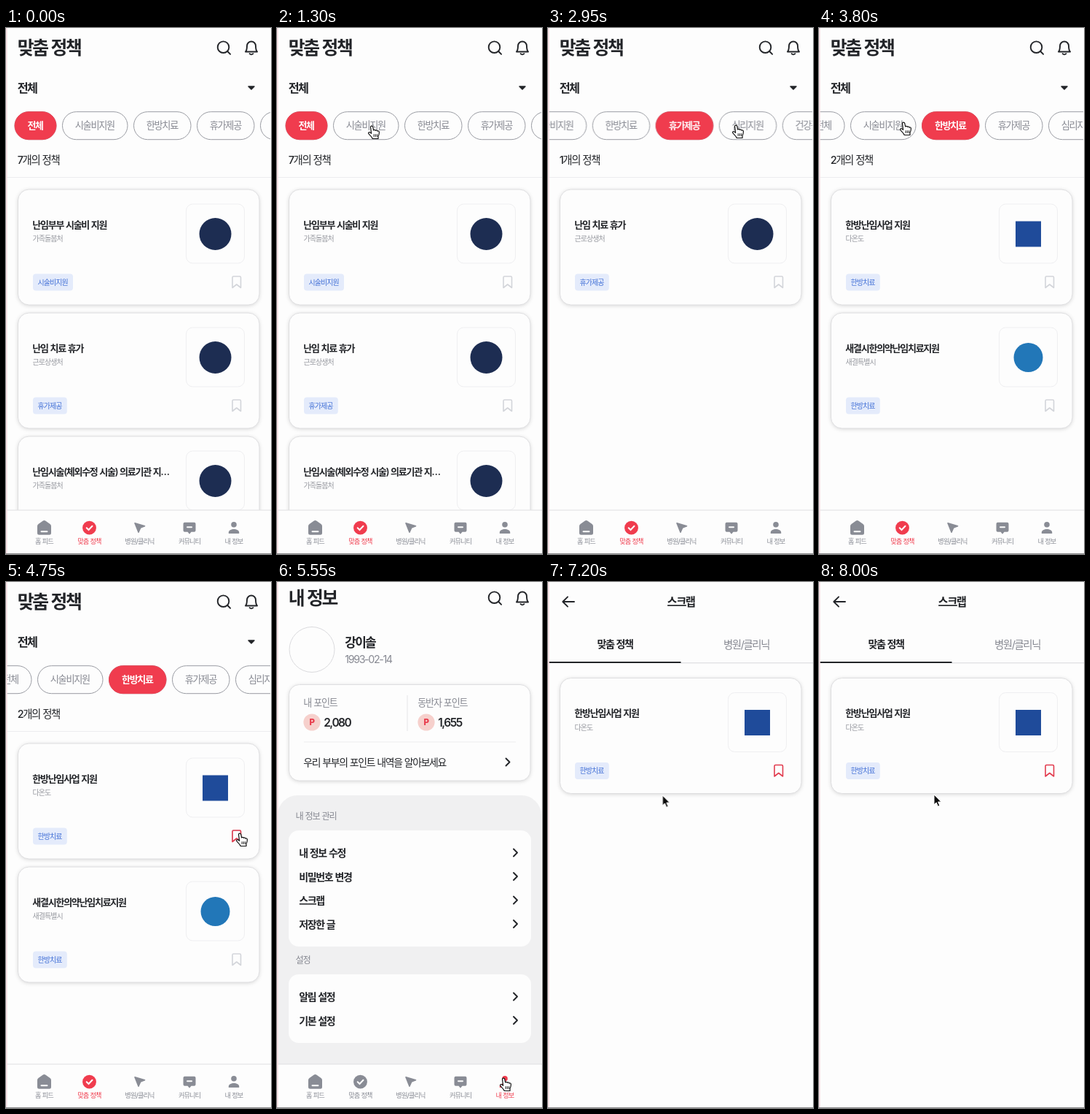
Write an HTML page that moves like this. It is 364 px wide and 720 px high and loops after 8050 ms.

```html
<!DOCTYPE html>
<html lang="ko">
<head>
<meta charset="utf-8">
<title>맞춤 정책</title>
<style>
html, body { margin: 0; width: 100%; height: 100%; overflow: hidden; background: #fdfdfd; }
svg { display: block; width: 364px; height: 720px; }
text { font-family: Inter, 'Noto Sans CJK KR', 'Noto Sans CJK', sans-serif; letter-spacing: -.097em; word-spacing: .06em; white-space: pre; }
.card { fill: #fdfdfd; stroke: #dedee0; filter: drop-shadow(0 1.5px 2.5px rgba(0, 0, 0, .14)); }
.line { fill: none; stroke: #222428; stroke-width: 1.9; stroke-linecap: round; stroke-linejoin: round; }
.mark { fill: none; stroke-width: 1.6; stroke-linejoin: round; }
</style>
</head>
<body>
<svg id="stage" viewBox="0 0 364 720" lang="ko"></svg>
<script>
const LOOP = 8050;
const INK = '#222428', GRAY = '#878992', RED = '#f03c4e', NAVY = '#1d2d52', BLUE = '#1f4b9a', SKY = '#2277b8';
const OPEN_ME = 5450, OPEN_SCRAP = 6300, SAVE = 4700;
const PICK = { fee: 1750, herb: 2200, leave: 2720, back: 3450 };

// ---- animation rules, times in ms ----
const pct = ms => Math.max(0, (ms - 1) / LOOP * 100).toFixed(3) + '%';
let css = '';

// visible from the first time, hidden from the second, and so on
function show(name, ...times) {
  const steps = times.map((t, i) => `${pct(t)}{opacity:${(i + 1) % 2}}`).join('');
  const last = times.length % 2;
  css += `@keyframes ${name}{${times[0] ? '0%{opacity:0}' : ''}${steps}100%{opacity:${last}}}
    .${name}{animation:${name} ${LOOP}ms step-end infinite}`;
}

// each key is [time, x, y, easing to the next key]
function move(name, keys) {
  const at = ([, x, y]) => `transform:translate(${x}px,${y}px)`;
  const steps = keys.map(k => `${pct(k[0])}{${at(k)};animation-timing-function:${k[3] || 'ease'}}`).join('');
  css += `@keyframes ${name}{0%{${at(keys[0])}}${steps}100%{${at(keys[keys.length - 1])}}}
    .${name}{animation:${name} ${LOOP}ms infinite}`;
}

show('policy', 0, OPEN_ME);
show('me', OPEN_ME, OPEN_SCRAP);
show('scrap', OPEN_SCRAP);
show('all', 0, PICK.fee);
show('fee', PICK.fee, PICK.herb);
show('herb', PICK.herb, PICK.leave, PICK.back);
show('leave', PICK.leave, PICK.back);
show('saved', SAVE);
show('hand', 1150, 4360, 4480, 4960, 5110, 5680, 6050, OPEN_SCRAP);
show('arrow', 0, 1150, 4360, 4480, 4960, 5110, 5680, 6050, OPEN_SCRAP);

move('chips', [
  [PICK.herb, 0, 0], [PICK.herb + 350, -34, 0],
  [PICK.leave, -34, 0], [PICK.leave + 350, -121, 0],
  [PICK.back, -121, 0], [PICK.back + 350, -34, 0]
]);
move('cursor', [
  [800, 175, -22, 'linear'], [900, 167, 29, 'ease-out'], [1250, 130, 134],
  [1800, 130, 134], [2100, 210, 136], [2250, 210, 136], [2600, 258, 133],
  [3050, 258, 133], [3400, 116, 129],
  [3880, 116, 129, 'ease-in'], [4300, 190, 131, 'ease-out'], [4650, 321, 344],
  [4850, 321, 344], [5250, 311, 679],
  [5600, 311, 679], [6200, 65, 434],
  [6450, 65, 434], [7300, 158, 291]
]);

// ---- drawing helpers ----
const group = (cls, ...parts) => `<g class="${cls}">${parts.join('')}</g>`;
const shift = (x, y, ...parts) => `<g transform="translate(${x} ${y})">${parts.join('')}</g>`;
const rect = (x, y, w, h, r, attrs) => `<rect x="${x}" y="${y}" width="${w}" height="${h}" rx="${r}" ${attrs}/>`;
const fill = c => `fill="${c}"`;
const circle = (x, y, r, attrs) => `<circle cx="${x}" cy="${y}" r="${r}" ${attrs}/>`;
const path = (d, attrs) => `<path d="${d}" ${attrs}/>`;

// cy is the middle of the glyphs
function text(s, x, cy, size, color = INK, weight = 400, anchor = 'start') {
  const left = anchor === 'start' ? x - size * .05 : x;
  return `<text x="${left.toFixed(2)}" y="${(cy + size * .36).toFixed(2)}" font-size="${size}" font-weight="${weight}" fill="${color}" text-anchor="${anchor}">${s}</text>`;
}
const middle = (s, x, cy, size, color, weight) => text(s, x, cy, size, color, weight, 'middle');
const chevron = (x, y) => path(`M${x - 2.5} ${y - 5}l5 5-5 5`, 'class="line"');

const header = (title, cy) => text(title, 17, cy, 24.8, INK, 700) + shift(0, cy - 27,
  circle(298.5, 26.2, 7.8, 'class="line"'), path('M304.3 32l3.8 3.8', 'class="line"'),
  path('M329 32.5c1.6-1.8 2-3.4 2-8a6 6 0 0 1 12 0c0 4.6.4 6.2 2 8zM334.6 35.2q2.4 2.4 4.8 0', 'class="line"'));

const bookmark = (y, cls, color) => path(`M311 ${y + 120.5}q0-1.5 1.5-1.5h8.5q1.5 0 1.5 1.5v14l-5.75-4.5-5.75 4.5z`, `class="mark ${cls}" stroke="${color}"`);

const logos = {
  state: y => circle(287.5, y, 22, fill(NAVY)),
  province: y => rect(270, y - 17.5, 35, 35, 0, fill(BLUE)),
  city: y => circle(287.5, y, 20, fill(SKY))
};

function card(y, [title, office, tag, logo], save = '') {
  const w = tag.length * 8.2 + 14;
  return rect(16.5, y, 331.5, 158, 15, 'class="card"') +
    text(title, 37, y + 48.3, 13, INK, 600) +
    text(office, 37, y + 67.8, 10, '#96989f') +
    rect(37, y + 115.5, w, 23, 4, fill('#e4ebfb')) +
    middle(tag, 36.6 + w / 2, y + 127, 10, '#4270d6', 500) +
    rect(247.5, y + 20, 80, 81, 9, 'fill="#fdfdfd" stroke="#efeff1"') +
    logos[logo](y + 61) +
    bookmark(y, '', save === 'on' ? '#e23c4f' : '#d3d5da') +
    (save === 'saved' ? bookmark(y, 'saved', '#e23c4f') : '');
}

const FEE = ['난임부부 시술비 지원', '가족돌봄처', '시술비지원', 'state'];
const LEAVE = ['난임 치료 휴가', '근로상생처', '휴가제공', 'state'];
const CLINIC = ['난임시술(체외수정 시술) 의료기관 지…', '가족돌봄처', '시술비지원', 'state'];
const HERB = ['한방난임사업 지원', '다온도', '한방치료', 'province'];
const CITY = ['새결시한의약난임치료지원', '새결특별시', '한방치료', 'city'];

const list = (cls, count, cards) => group(cls,
  text(count + '개의 정책', 16.5, 181.2, 14.4, INK, 500),
  ...cards.map((c, i) => card(221 + i * 169, c, c === HERB ? 'saved' : '')));

// ---- bottom bar ----
const icons = [
  c => path('M-9.5-2.5Q-9.5-4-8-5.2L-2-9.5Q0-11 2-9.5L8-5.2Q9.5-4 9.5-2.5V7Q9.5 9.5 7 9.5H-7Q-9.5 9.5-9.5 7z', fill(c)) + rect(-5, 4, 10, 2, 1, fill('#fdfdfd')),
  c => circle(0, 0, 9.4, fill(c)) + path('M-3.8 0l2.8 2.8L4-2.4', 'fill="none" stroke="#fdfdfd" stroke-width="2" stroke-linecap="round"'),
  c => path('M-6.5-6.5L7-2.5 1.3-.2-1.5 6z', `fill="${c}" stroke="${c}" stroke-width="1.6" stroke-linejoin="round"`),
  c => path('M-6.5-7.5h13q2 0 2 2v9q0 2-2 2H2.5L0 8.5-2.5 5.5h-4q-2 0-2-2v-9q0-2 2-2z', fill(c)) + rect(-4, -2, 8, 2, 1, fill('#fdfdfd')),
  c => circle(0, -4.5, 3.8, fill(c)) + path('M-7.2 7.8V6.5C-7.2.3 7.2.3 7.2 6.5V7.8z', fill(c))
];
const tabs = [['홈 피드', 52.5], ['맞춤 정책', 114.5], ['병원/클리닉', 183.5], ['커뮤니티', 252], ['내 정보', 313]];

const nav = active => rect(0, 660, 364, 60, 0, fill('#fdfdfd')) + rect(0, 659.5, 364, 1, 0, fill('#dfdfe1')) +
  tabs.map(([label, x], i) => {
    const c = i === active ? RED : '#898c95';
    return shift(x, 684.2, icons[i](c)) + middle(label, x, 702.8, 9.2, c, 500);
  }).join('');

// ---- pages ----
const chipList = [['전체', 12, 57, 'all'], ['시술비지원', 77.5, 89.5, 'fee'], ['한방치료', 175.5, 78.5, 'herb'],
  ['휴가제공', 262.5, 78.5, 'leave'], ['심리지원', 349.5, 78.5], ['건강관리', 436.5, 78.5]];

const chip = ([label, x, w, cls]) => {
  const mid = x + w / 2 - .4;
  const pill = attrs => rect(x, 114.7, w, 38, 19, attrs);
  return pill('fill="#fdfdfd" stroke="#999ba2"') + middle(label, mid, 133.5, 13.2, GRAY, 500) +
    (cls ? group(cls, pill(`fill="${RED}" stroke="${RED}" stroke-width=".8"`), middle(label, mid, 133.5, 13, '#fff', 600)) : '');
};

const policy = group('policy',
  header('맞춤 정책', 27),
  text('전체', 16.5, 82, 16.3, INK, 700),
  path('M333 80h8l-4 4z', `fill="${INK}" stroke="${INK}" stroke-width="1.5" stroke-linejoin="round"`),
  `<g clip-path="url(#view)">${group('chips', ...chipList.map(chip))}</g>`,
  rect(0, 204, 364, 1, 0, fill('#ededef')),
  list('all', 7, [FEE, LEAVE, CLINIC]),
  list('fee', 2, [FEE, CLINIC]),
  list('herb', 2, [HERB, CITY]),
  list('leave', 1, [LEAVE]),
  nav(1));

const points = (x, label, amount) => text(label, x, 165.5, 13.1, GRAY) +
  circle(x + 11, 192, 11.6, fill('#f6d0cc')) + middle('P', x + 10.6, 192, 11.5, '#e8394a', 800) +
  text(amount, x + 28, 192.3, 15.5, INK, 600);

const row = (label, y) => text(label, 31, y, 14, INK, 600) + chevron(327.5, y - .5);

const me = group('me',
  header('내 정보', 22),
  circle(48, 92.5, 31, 'fill="#fdfdfd" stroke="#dadadd"'),
  text('강이솔', 94, 82.5, 17, INK, 700),
  text('1993-02-14', 94, 106, 14.3, GRAY),
  rect(16.5, 140.5, 331.5, 131.5, 14, 'class="card"'),
  points(37, '내 포인트', '2,080'),
  points(194, '동반자 포인트', '1,655'),
  rect(178.5, 155, 1, 49, 0, fill('#e6e6e8')),
  rect(37, 218.5, 291, 1, 0, fill('#eeeef0')),
  text('우리 부부의 포인트 내역을 알아보세요', 37, 246.5, 13.9, INK, 500),
  chevron(317, 246.5),
  rect(1, 292, 362, 420, 27, fill('#f0f0f1')),
  text('내 정보 관리', 26, 321, 12.2, GRAY),
  rect(16, 340, 333, 159, 14, fill('#fdfdfd')),
  row('내 정보 수정', 371), row('비밀번호 변경', 403.5), row('스크랩', 436), row('저장한 글', 468.5),
  text('설정', 26, 518, 12.2, GRAY),
  rect(16, 537, 333, 94, 14, fill('#fdfdfd')),
  row('알림 설정', 568), row('기본 설정', 600.5),
  nav(4));

const scrap = group('scrap',
  path('M36 27H20.5M27 20.3L20.3 27l6.7 6.7', 'class="line"'),
  middle('스크랩', 182.5, 27, 15.4, INK, 700),
  middle('맞춤 정책', 92, 85, 14.1, INK, 700),
  middle('병원/클리닉', 272.5, 86, 14.4, GRAY),
  rect(182, 110.3, 182, 1, 0, fill('#d8d8da')),
  rect(1, 109, 181.5, 2, 0, fill(INK)),
  card(131.5, HERB, 'on'));

const cursor = group('cursor',
  group('arrow', path('M0 0V13.8L3.2 10.9 5.4 16.2 7.8 15.2 5.6 10H9.9z', 'fill="#0b0b0b" stroke="#fff" stroke-width="1"')),
  group('hand',
    path('M-1.5 1.6C-1.5-.4 1.4-.4 1.8 1.6L2.6 6C3 5 5 5 5.4 6.4 6 5.6 7.8 5.8 8 7.2 8.8 6.6 10.3 7 10.4 8.4 10.6 11.5 10 12.5 9 14.5V17.5H1.2C.6 15.5-2.6 12.6-4.2 10.6-5 9.4-3.6 8-2.2 8.9L-.4 10.4z',
      'fill="#fff" stroke="#111" stroke-width="1.2" stroke-linejoin="round"'),
    path('M3.2 11.3v3.6M5.4 11.3v3.6M7.6 11.3v3.6', 'fill="none" stroke="#111" stroke-width="1"')));

document.head.appendChild(document.createElement('style')).textContent = css;
document.getElementById('stage').innerHTML =
  '<clipPath id="view"><rect x="1" y="110" width="362" height="48"/></clipPath>' +
  rect(0, 0, 364, 720, 0, fill('#fdfdfd')) + policy + me + scrap +
  rect(0, 0, 1.7, 720, 0, fill('#f9e2e6')) + rect(0, 719, 364, 1, 0, fill('#8c8c8e')) + cursor;
</script>
</body>
</html>
```
